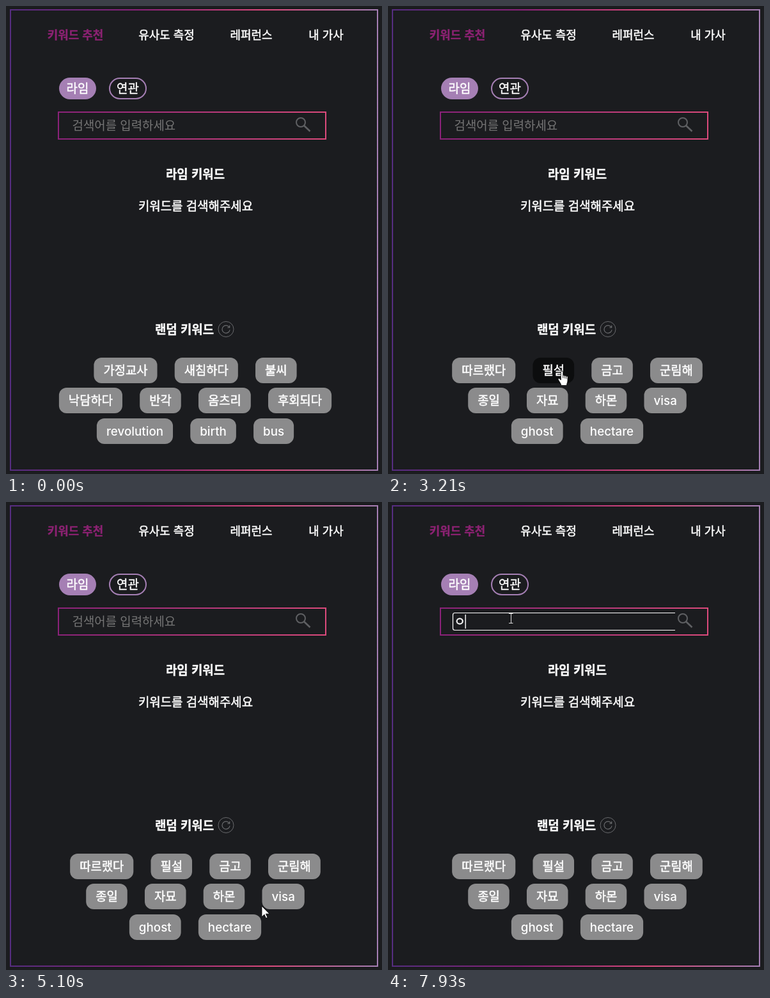
An HTML page for the animation above (8000 ms loop, 588 by 732 pixels).

```html
<!DOCTYPE html>
<html lang="ko">
<head>
<meta charset="utf-8">
<title>키워드 추천</title>
<style>
  html, body { margin: 0; width: 100%; height: 100%; overflow: hidden; background: #1b1c1f; }
  svg { display: block; }
  text {
    font: 400 18.9px "Noto Sans CJK KR", "Noto Sans CJK", sans-serif;
    fill: #fff; text-anchor: middle;
  }
  .medium { stroke: #fff; stroke-width: .5px; }
  .bold { font-weight: 700; stroke: #fff; stroke-width: .35px; }
  .nav { font-size: 17.9px; }
  .active { fill: #8b2272; stroke: #8b2272; }
  .pill { font-size: 18.8px; }
  .latin { font-family: Inter, sans-serif; font-weight: 500; stroke: none; }
  .start { text-anchor: start; }
</style>
</head>
<body>
<svg width="588" height="732" viewBox="0 0 588 732">
  <defs>
    <linearGradient id="frame" gradientUnits="userSpaceOnUse" x1="6" y1="0" x2="582" y2="0">
      <stop offset="0" stop-color="#562d80"/>
      <stop offset=".35" stop-color="#8a2279"/>
      <stop offset=".7" stop-color="#dc4a7c"/>
      <stop offset="1" stop-color="#a57fb4"/>
    </linearGradient>
    <linearGradient id="field" gradientUnits="userSpaceOnUse" x1="81" y1="0" x2="501" y2="0">
      <stop offset="0" stop-color="#8a2279"/>
      <stop offset="1" stop-color="#dc4a7c"/>
    </linearGradient>
  </defs>
  <rect width="588" height="732" fill="#1b1c1f"/>
  <rect x="7" y="6" width="574" height="720" fill="none" stroke="url(#frame)" stroke-width="2"/>

  <text class="nav bold active" x="108.5" y="51.5">키워드 추천</text>
  <text class="nav medium" x="251" y="51.5">유사도 측정</text>
  <text class="nav medium" x="383.5" y="51.5">레퍼런스</text>
  <text class="nav medium" x="500.5" y="51.5">내 가사</text>

  <rect x="83" y="112" width="58" height="34" rx="17" fill="#a57fb4"/>
  <text class="medium" x="112" y="135.5">라임</text>
  <rect x="162" y="113" width="57" height="32" rx="16" fill="none" stroke="#a57fb4" stroke-width="2"/>
  <text class="medium" x="190.5" y="135.5">연관</text>

  <rect x="82" y="166" width="418" height="42" fill="none" stroke="url(#field)" stroke-width="2"/>
  <text id="placeholder" class="start" x="103.5" y="193.5" style="fill:#757575">검색어를 입력하세요</text>
  <g id="focus">
    <path d="M449 173.5H104.5a3 3 0 0 0-3 3V197.5a3 3 0 0 0 3 3H449" fill="none" stroke="#fff" stroke-width="1.2"/>
    <text id="typed" class="start medium" x="103.5" y="193.5">ㅇ</text>
    <rect id="caret" y="176" width="1.4" height="22" fill="#fff"/>
  </g>
  <g fill="none" stroke="#5f6063">
    <circle cx="461" cy="182" r="7" stroke-width="2"/>
    <path d="M466 187L475.5 196" stroke-width="2.6"/>
  </g>

  <text class="bold" x="296" y="269.5">라임 키워드</text>
  <text class="medium" x="296.5" y="320">키워드를 검색해주세요</text>
  <text class="bold" x="279" y="512.5">랜덤 키워드</text>
  <g fill="none" stroke="#696a6d">
    <circle cx="344" cy="505.5" r="12"/>
    <path d="M349.2 502.5A6 6 0 1 0 350 506.5M349.7 499.5V503H346.2" stroke-width="1.2"/>
  </g>

  <g id="pills"></g>
  <circle id="ripple" r="15" fill="#fff" opacity=".3"/>
  <g id="cursor">
    <path id="arrow" d="M0 0V17L4 13.2L6.6 19L9 18L6.4 12.2H12Z" fill="#fff" stroke="#000" stroke-width=".8"/>
    <g id="hand" stroke="#000" stroke-width=".8">
      <path d="M-1.7 1.7A1.7 1.7 0 0 1 1.7 1.7V7.2A1.4 1.4 0 0 1 4.2 7.8A1.4 1.4 0 0 1 6.7 8.8A1.3 1.3 0 0 1 9 10.2V15C9 18 7.5 19 7.5 22.5H-1.2C-1.5 19.5-3.5 17.5-5.6 13.8C-6.6 12-4.6 10.8-3.2 12.2L-1.7 14Z" fill="#fff"/>
      <path d="M1.7 7V11M4.2 8V11.5M6.7 9V12"/>
    </g>
    <path id="beam" d="M-3-7.500H3.5M.5-7.5V7.5M-3 7.5H3.5" fill="none" stroke="#ddd"/>
  </g>
</svg>
<script>
const LOOP = 8000, STEP = 1000 / 15, HOVER_LAG = 40;
const CENTER = 296, GAP = 27.2, PADDING = 15, PILL_HEIGHT = 40, ROW_TOP = 550, ROW_PITCH = 47.5;
const $ = id => document.getElementById(id);
const show = (node, on) => node.setAttribute("display", on ? "inline" : "none");

const sets = [
  { from: 0, rows: ["가정교사 새침하다 불씨", "낙담하다 반각 옴츠리 후회되다", "revolution birth bus"] },
  { from: 1470, rows: ["노을 달무리 조약돌 한걸음", "흔들리다 소나기 발자국 등불", "mountain window"] },
  { from: 2260, rows: ["따르랬다 필설 금고 군림해", "종일 자묘 하몬 visa", "ghost hectare"] }
];

function make(tag, attrs, parent) {
  const node = document.createElementNS("http://www.w3.org/2000/svg", tag);
  for (const key in attrs) node.setAttribute(key, attrs[key]);
  return parent.appendChild(node);
}

// Each pill fits its word; each row is centred.
function buildRow(row, index, group) {
  const y = Math.floor(ROW_TOP + index * ROW_PITCH);
  const pills = row.split(" ").map(word => {
    const rect = make("rect", { y, height: PILL_HEIGHT, rx: 12 }, group);
    const script = /[a-z]/.test(word) ? "latin" : "medium";
    const label = make("text", { y: y + 26.5, class: "pill " + script }, group);
    label.textContent = word;
    return { rect, label, y, width: label.getComputedTextLength() + 2 * PADDING };
  });
  let x = CENTER - pills.reduce((sum, p) => sum + p.width + GAP, -GAP) / 2;
  for (const pill of pills) {
    pill.x = x;
    pill.rect.setAttribute("x", x);
    pill.rect.setAttribute("width", pill.width);
    pill.label.setAttribute("x", x + pill.width / 2);
    x += pill.width + GAP;
  }
  return pills;
}

for (const set of sets) {
  set.group = make("g", {}, $("pills"));
  set.pills = set.rows.flatMap((row, i) => buildRow(row, i, set.group));
}

// Cursor strokes: each passes its key points at an even pace.
const strokes = [
  { from: 270, to: 930, via: [[583, 718], [574, 572], [440, 520], [350, 495]] },
  { from: 2730, to: 3000, via: [[345, 501], [270, 567]] },
  { from: 3210, to: 3960, via: [[272, 571], [205, 569], [165, 590], [167, 606], [204, 612]] },
  { from: 4020, to: 4760, via: [[213, 614], [258, 618], [318, 616], [355, 636], [355, 656]] },
  { from: 4830, to: 5370, via: [[360, 655], [400, 632], [425, 620]] },
  { from: 5510, to: 6130, via: [[392, 600], [372, 580], [395, 572], [450, 576]] },
  { from: 6390, to: 6860, via: [[440, 560], [192, 182]] }
];
const clicks = [1270, 2130, 7130], CLICK_LENGTH = 135;

function cursorAt(t) {
  const { from, to, via } = strokes.filter(s => s.from <= t).pop() || strokes[0];
  const steps = Math.max(0, Math.floor((t - from) / STEP + .15));
  const along = Math.min(1, steps * STEP / (to - from)) * (via.length - 1);
  const i = Math.min(via.length - 2, Math.floor(along));
  const [x, y] = via[i].map((v, axis) => v + (via[i + 1][axis] - v) * (along - i));
  return { x, y };
}

const inside = (p, x, y, w, h) => p.x >= x && p.x <= x + w && p.y >= y && p.y <= y + h;
const overPill = (p, pill) => inside(p, pill.x, pill.y, pill.width, PILL_HEIGHT);

function render(t) {
  const current = sets.filter(s => s.from <= t).pop();
  const point = cursorAt(t), lagged = cursorAt(t - HOVER_LAG);

  for (const set of sets) show(set.group, set === current);
  for (const pill of current.pills)
    pill.rect.setAttribute("fill", overPill(lagged, pill) ? "#0c0d0e" : "#8b8b8c");

  const onHand = inside(point, 331, 493, 26, 26) || current.pills.some(pill => overPill(point, pill));
  const onInput = inside(point, 101, 167, 349, 40);
  show($("cursor"), t >= strokes[0].from);
  show($("hand"), onHand);
  show($("beam"), onInput);
  show($("arrow"), !onHand && !onInput);
  $("cursor").setAttribute("transform", `translate(${Math.round(point.x)} ${Math.round(point.y)})`);

  show($("ripple"), clicks.some(c => t >= c && t < c + CLICK_LENGTH));
  $("ripple").setAttribute("cx", point.x);
  $("ripple").setAttribute("cy", point.y);

  const focused = t >= 7130, typed = t >= 7930;
  show($("placeholder"), !focused);
  show($("focus"), focused);
  show($("typed"), typed);
  show($("caret"), typed || t < 7730);
  $("caret").setAttribute("x", typed ? 120.5 : 104);
}

function tick() {
  render(performance.now() % LOOP);
  requestAnimationFrame(tick);
}
tick();
</script>
</body>
</html>
```
